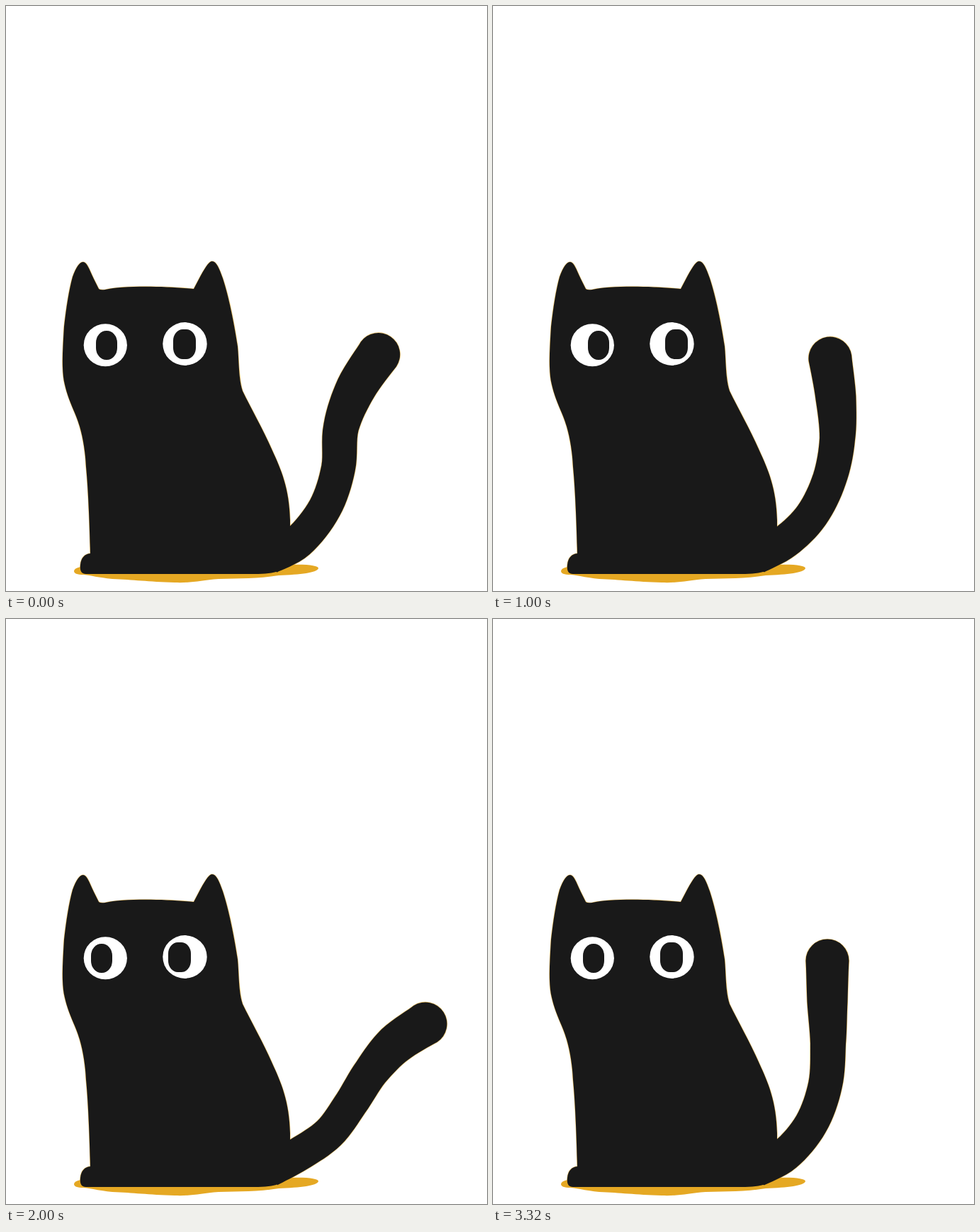
These frames come from a looping animation (679 by 825 pixels, 3.36 s). An HTML page:

```html
<!DOCTYPE html>
<html lang="en">
<head>
<meta charset="utf-8">
<title>Cat</title>
<style>
  html, body { margin: 0; width: 100%; height: 100%; overflow: hidden; background: #fff; }
  svg { display: block; width: 100vw; height: 100vh; }
</style>
</head>
<body>
<svg viewBox="0 0 679 825">
  <path fill="#e5a823" d="M96 797C97 792 103 791 112 791L400 788C425 787 441 789 441 793C440 799 415 802 385 803C355 808 330 807 300 808C275 810 262 814 238 813C200 812 180 809 150 808C130 806 120 803 110 802C100 802 96 800 96 797Z"/>
  <path id="cat" fill="#191919" stroke="#e5a823" stroke-width="1.2" stroke-opacity=".7" paint-order="stroke"/>
  <g fill="#fff">
    <ellipse cx="140.3" cy="478.2" rx="30.6" ry="30"/>
    <ellipse cx="252.5" cy="476.5" rx="31.2" ry="30.4"/>
  </g>
  <g id="pupils" fill="#191919">
    <rect x="127" y="458" width="30" height="41" rx="14.5" ry="17"/>
    <rect x="236" y="456" width="32" height="42" rx="13.5" ry="16"/>
  </g>
</svg>
<script>
const LOOP = 3360, STEP = 40, SWING = 2700;

const BODY = 'M113 801C106 801 104 796 105 788C106 778 111 773 119 772' +
  'C118 730 116 680 113 650C112 630 109 610 104 593C98 572 89 560 83 534' +
  'C78 515 80 485 82 452C85 425 89 400 94 382C99 368 104 361 109 361' +
  'C114 361 117 370 124 385L131 399Q133 401 140 400C165 394 225 395 265 399' +
  'L275 380C283 366 287 360 291 360C297 360 301 370 306 384C314 408 322 447 327 480' +
  'C329 500 328 525 334 543C345 566 363 597 376 627C388 653 400 680 401 725' +
  'L401 760L384 797Q374 801 350 801Z';

// Tail centre line at points of one swing: time, then x,y from mid tail to tip.
const POSES = [
  [0,    450,708, 469,652, 473,594, 494,539, 526,491],
  [400,  448,710, 468,656, 473,598, 481,541, 490,484],
  [620,  449,712, 469,657, 473,599, 472,540, 472,482],
  [1000, 450,718, 475,667, 486,611, 484,553, 476,497],
  [1400, 459,722, 491,681, 518,638, 535,589, 542,538],
  [1680, 460,722, 493,680, 522,636, 549,593, 582,556],
  [2000, 456,725, 487,683, 515,639, 549,600, 592,571],
  [2240, 454,721, 483,676, 504,627, 534,583, 583,549]
];
const ROOT = [[372, 777], [413, 755]];
const HALF_WIDTHS = [24, 24, 23.7, 24, 25, 28.5, 30.5];
const LOOKS = [[180, 7], [1520, -7], [2980, 0]];

const cat = document.getElementById('cat');
const pupils = document.getElementById('pupils');
const mix = (a, b, u) => a + (b - a) * u;

function hermite(a, b, ta, tb, u) {
  const u2 = u * u, u3 = u2 * u;
  return a * (2 * u3 - 3 * u2 + 1) + ta * (u3 - 2 * u2 + u) +
         b * (3 * u2 - 2 * u3) + tb * (u3 - u2);
}

function poseAt(i) {
  const n = POSES.length, turn = Math.floor(i / n);
  const [time, ...xy] = POSES[i - turn * n];
  return { time: time + turn * SWING, xy };
}

function tailPoints(t) {
  t %= SWING;
  let i = 0;
  while (poseAt(i + 1).time <= t) i++;
  const [p, a, b, q] = [i - 1, i, i + 1, i + 2].map(poseAt);
  const span = b.time - a.time;
  const slope = (l, m, r, k) => {
    const d1 = m.time - l.time, d2 = r.time - m.time;
    return ((m.xy[k] - l.xy[k]) / d1 * d2 + (r.xy[k] - m.xy[k]) / d2 * d1) / (d1 + d2);
  };
  const xy = a.xy.map((v, k) => hermite(v, b.xy[k],
    slope(p, a, b, k) * span, slope(a, b, q, k) * span, (t - a.time) / span));
  const points = [...ROOT];
  for (let k = 0; k < xy.length; k += 2) points.push([xy[k], xy[k + 1]]);
  return points;
}

function tailPath(points) {
  const last = points.length - 1, detail = 8, line = [];
  const at = k => points[Math.max(0, Math.min(last, k))];
  for (let s = 0; s <= last * detail; s++) {
    const k = Math.min(last - 1, Math.floor(s / detail)), u = s / detail - k;
    const [x, y] = [0, 1].map(c => hermite(at(k)[c], at(k + 1)[c],
      (at(k + 1)[c] - at(k - 1)[c]) / 2, (at(k + 2)[c] - at(k)[c]) / 2, u));
    line.push({ x, y, half: mix(HALF_WIDTHS[k], HALF_WIDTHS[k + 1], u) });
  }
  const left = [], right = [];
  line.forEach((c, i) => {
    const a = line[Math.max(0, i - 1)], b = line[Math.min(line.length - 1, i + 1)];
    const dx = b.x - a.x, dy = b.y - a.y, scale = c.half / Math.hypot(dx, dy);
    const side = sign => (c.x + sign * dy * scale).toFixed(2) + ' ' + (c.y - sign * dx * scale).toFixed(2);
    left.push(side(1));
    right.unshift(side(-1));
  });
  const r = HALF_WIDTHS[last];
  return `M${left.join('L')}A${r} ${r} 0 0 1 ${right.join('L')}Z`;
}

function look(t) {
  let x = 0;
  for (const [start, goal] of LOOKS) {
    const u = Math.max(0, Math.min(1, (t - start) / 80));
    x = mix(x, goal, u * u * (3 - 2 * u));
  }
  return x;
}

function draw(t) {
  cat.setAttribute('d', BODY + tailPath(tailPoints(t)));
  pupils.setAttribute('transform', `translate(${look(t)} 0)`);
}

const begin = performance.now();
function tick() {
  const t = (performance.now() - begin) % LOOP;
  draw(Math.floor(t / STEP) * STEP);
  requestAnimationFrame(tick);
}
tick();
</script>
</body>
</html>
```
